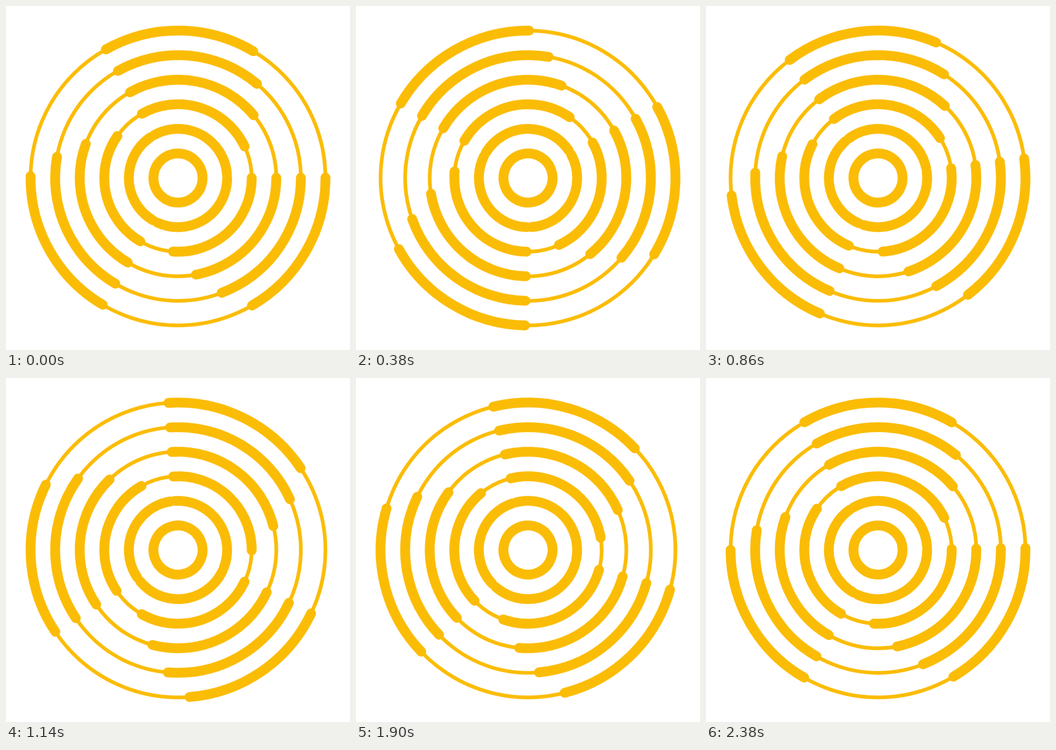
An HTML page that plays this animation: 748 px wide and 748 px high, repeating every 2400 ms.

```html
<!DOCTYPE html>
<html lang="en">
<head>
<meta charset="utf-8">
<title>Spinning rings</title>
<style>
  html, body { margin: 0; width: 100%; height: 100%; overflow: hidden; background: #fff; }
  svg { display: block; width: 100vw; height: 100vh; }
  circle { fill: none; stroke: #fbbc05; }
  #wheel { transform-origin: 374px 374px; }
</style>
</head>
<body>
<svg viewBox="0 0 748 748"><g id="wheel"></g></svg>
<script>
  const CENTER = 374;
  const STEP = 748 / 14;
  const THICK = STEP * 0.4;
  const THIN = STEP * 0.15;
  const SWEEPS = [360, 115, 94, 79.6, 69.3, 60]; // arc lengths in degrees, inner to outer
  const SPACING = [119.2, 120.8, 120];           // degrees between arc starts

  const wheel = document.getElementById('wheel');

  function ring(radius, width, attrs = {}) {
    const el = document.createElementNS('http://www.w3.org/2000/svg', 'circle');
    const all = { cx: CENTER, cy: CENTER, r: radius, 'stroke-width': width, ...attrs };
    for (const [key, value] of Object.entries(all)) el.setAttribute(key, value);
    wheel.append(el);
  }

  SWEEPS.forEach((sweep, i) => {
    const radius = STEP * (i + 1);
    if (sweep === 360) return ring(radius, THICK);
    ring(radius, THIN);
    ring(radius, THICK, {
      pathLength: 360,
      'stroke-linecap': 'round',
      'stroke-dasharray': SPACING.flatMap(s => [sweep, s - sweep]).join(' '),
      transform: `rotate(-120 ${CENTER} ${CENTER})`
    });
  });

  // One full turn that overshoots and settles back
  wheel.animate(
    [{ transform: 'rotate(0deg)' }, { transform: 'rotate(360deg)' }],
    { duration: 2400, iterations: Infinity, easing: 'cubic-bezier(.34, 1.55, .65, 1)' }
  );
</script>
</body>
</html>
```
